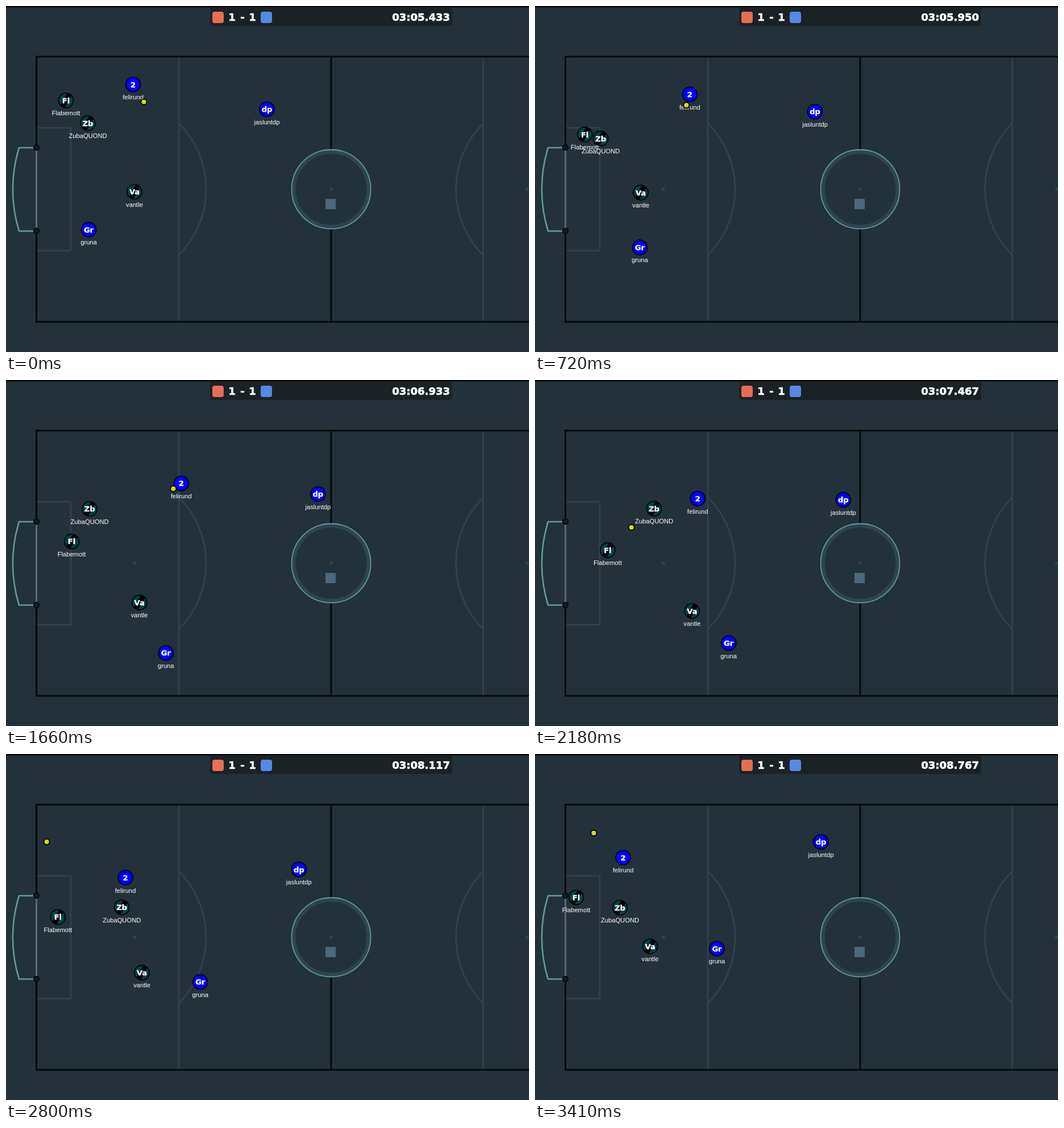
Animation of 920 by 608 pixels, one loop 3430 ms. Source, as an HTML page:

```html
<!DOCTYPE html>
<html lang="en">
<head>
<meta charset="utf-8">
<title>Match replay</title>
<style>
  html, body { margin: 0; width: 100%; height: 100%; overflow: hidden; background: #23323a; }
  svg { display: block; width: 920px; height: 608px; }
  .name { font: 11.2px "Liberation Sans", Arial, sans-serif; }
  .avatar { font: bold 13px "DejaVu Sans", sans-serif; stroke: #fff; stroke-width: .4; }
  .score { font: bold 18px "DejaVu Sans", sans-serif; stroke: #fff; stroke-width: .7; }
  text { fill: #fff; text-anchor: middle; }
  .mark { fill: none; stroke: #2f4450; stroke-width: 2.6; }
  .wall { fill: none; stroke: #060809; stroke-width: 3; }
  .dot { fill: #2f4450; }
</style>
</head>
<body>
<svg viewBox="0 0 920 608">
  <defs>
    <linearGradient id="stripes" gradientTransform="rotate(30 .5 .5)">
      <stop offset=".333" stop-color="#00424a"/>
      <stop offset=".333" stop-color="#000"/>
      <stop offset=".667" stop-color="#000"/>
      <stop offset=".667" stop-color="#00424a"/>
    </linearGradient>
  </defs>
  <rect width="920" height="608" fill="#23323a"/>
  <rect width="920" height="2.5" fill="#060809"/>

  <g class="mark">
    <path d="M304 90V554M839.5 90V554"/>
    <path d="M304 206A164.2 164.2 0 0 1 304 438M839.5 206A164.2 164.2 0 0 0 839.5 438"/>
    <path d="M54 214H112Q114 214 114 216V428Q114 430 112 430H54"/>
  </g>
  <path class="wall" d="M930 89H53.5V555H930M572 89V253M572 391V555"/>
  <circle cx="572" cy="322" r="66" fill="none" stroke="#2e4551" stroke-width="7"/>
  <circle cx="572" cy="322" r="69.5" fill="none" stroke="#639a96" stroke-width="1.8"/>
  <circle class="dot" cx="226" cy="322" r="3"/>
  <circle class="dot" cx="572" cy="322" r="3"/>
  <circle class="dot" cx="917.5" cy="322" r="3"/>
  <rect x="562" y="339" width="18" height="18" fill="#486a7b"/>

  <path d="M53.5 249H23A247.7 247.7 0 0 0 23 395.5H53.5" fill="none" stroke="#659a95" stroke-width="2.6" stroke-linejoin="round"/>
  <path d="M53.5 249V395" stroke="#566b7b" stroke-width="3"/>
  <g fill="#0e1d26" stroke="#05080b" stroke-width="1.8">
    <circle cx="53.5" cy="248.7" r="4.7"/>
    <circle cx="53.5" cy="395.3" r="4.7"/>
  </g>

  <g id="players"></g>
  <circle id="ball" r="5" fill="#d8d914" stroke="#000" stroke-width="1.8"/>

  <path d="M359 2H785V31Q785 35 781 35H363Q359 35 359 31Z" fill="#1b2226"/>
  <rect x="363" y="10" width="20" height="20" rx="4" fill="#e56e56"/>
  <rect x="448" y="10" width="20" height="20" rx="4" fill="#5689e5"/>
  <g class="score">
    <text x="397.5" y="26">1</text>
    <text x="416" y="26">-</text>
    <text x="433.5" y="26">1</text>
    <text id="clock" x="781" y="26" style="text-anchor:end"></text>
  </g>
</svg>
<script>
const LOOP = 3430, START = 270, STEP = 31.4;
const BLUE = "#0000ff", STRIPES = "url(#stripes)";
const $ = id => document.getElementById(id);

// Each run passes through a few points, evenly spaced in time
const players = [
  { name: "jasluntdp", tag: "dp", fill: BLUE,
    run: [[459, 181.5], [511, 189], [552, 203], [520, 211], [503, 154.5]] },
  { name: "gruna", tag: "Gr", fill: BLUE,
    run: [[145.5, 393], [196, 433], [260, 478], [339, 464], [342, 402], [320, 342]] },
  { name: "felirund", tag: "2", fill: BLUE,
    run: [[223.5, 138], [274, 156], [279, 163], [313, 190], [265, 215], [200, 215], [155, 182]] },
  { name: "vantle", tag: "Va", fill: STRIPES,
    run: [[226, 326.5], [182, 332], [219, 382], [276, 406], [240, 385], [202.5, 338]] },
  { name: "ZubaQUOND", tag: "Zb", fill: STRIPES,
    run: [[144, 206], [112, 237], [129, 229], [208, 225], [204.5, 269], [149.5, 270]] },
  { name: "Flabemott", tag: "Fl", fill: STRIPES,
    run: [[105.5, 166], [87, 229], [86, 279], [125, 285], [123, 303], [86, 282], [72.5, 252]] }
];

// Smooth curve through a run; u goes from 0 to 1
function along(run, u) {
  const last = run.length - 1;
  const i = Math.min(Math.floor(u * last), last - 1);
  const f = u * last - i, w = 1 - f;
  return [0, 1].map(axis => {
    const at = k => run[Math.max(0, Math.min(last, k))][axis];
    const slope = k => (at(k + 1) - at(k - 1)) / (k % last ? 2 : 1);
    return at(i) * w * w * (1 + 2 * f) + at(i + 1) * f * f * (3 - 2 * f)
      + f * w * (slope(i) * w - slope(i + 1) * f);
  });
}

// A kicked ball slows exponentially and would come to rest at from + reach
function glide(from, reach, ms) {
  const part = 1 - Math.exp(-ms / 1000);
  return from.map((v, axis) => v + reach[axis] * part);
}

function ballAt(t) {
  const shot = 1665, clear = 2350, feet = [294.5, 191], reach = [-316, 172];
  if (t < shot) {
    const u = (t - 210) / (shot - 210);
    return [242.5 + 52 * u ** .75, 168.5 + 22.5 * u ** 1.3];
  }
  if (t < clear) return glide(feet, reach, t - shot);
  const [x, y] = glide(glide(feet, reach, clear - shot), [-184, -339], t - clear);
  return [60 + Math.abs(x - 60), 96 + Math.abs(y - 96)]; // rebound off side and top walls
}

function place(node, [x, y]) {
  node.setAttribute("transform", `translate(${x.toFixed(2)} ${y.toFixed(2)})`);
}

$("players").innerHTML = players.map(p => `<g>
  <circle r="13" fill="${p.fill}" stroke="#000" stroke-width="1.7"/>
  <text class="avatar" y="4.7">${p.tag}</text>
  <text class="name" y="26.3">${p.name}</text></g>`).join("");
players.forEach((p, i) => p.node = $("players").children[i]);

function draw(now) {
  const step = Math.floor((now - START) / STEP + .01);
  const held = now < START ? 210 : START + step * STEP;
  const t = now < START ? held : held + 14;
  const u = Math.max(0, Math.min(1, (t - 220) / 3200));
  for (const p of players) place(p.node, along(p.run, u));
  place($("ball"), ballAt(t));
  const ticks = Math.floor(26.03 + (held - 210) * .06275);
  $("clock").textContent = "03:" + (5 + ticks / 60).toFixed(3).padStart(6, "0");
}

const start = performance.now();
function tick() {
  draw((performance.now() - start) % LOOP);
  requestAnimationFrame(tick);
}
tick();
</script>
</body>
</html>
```
